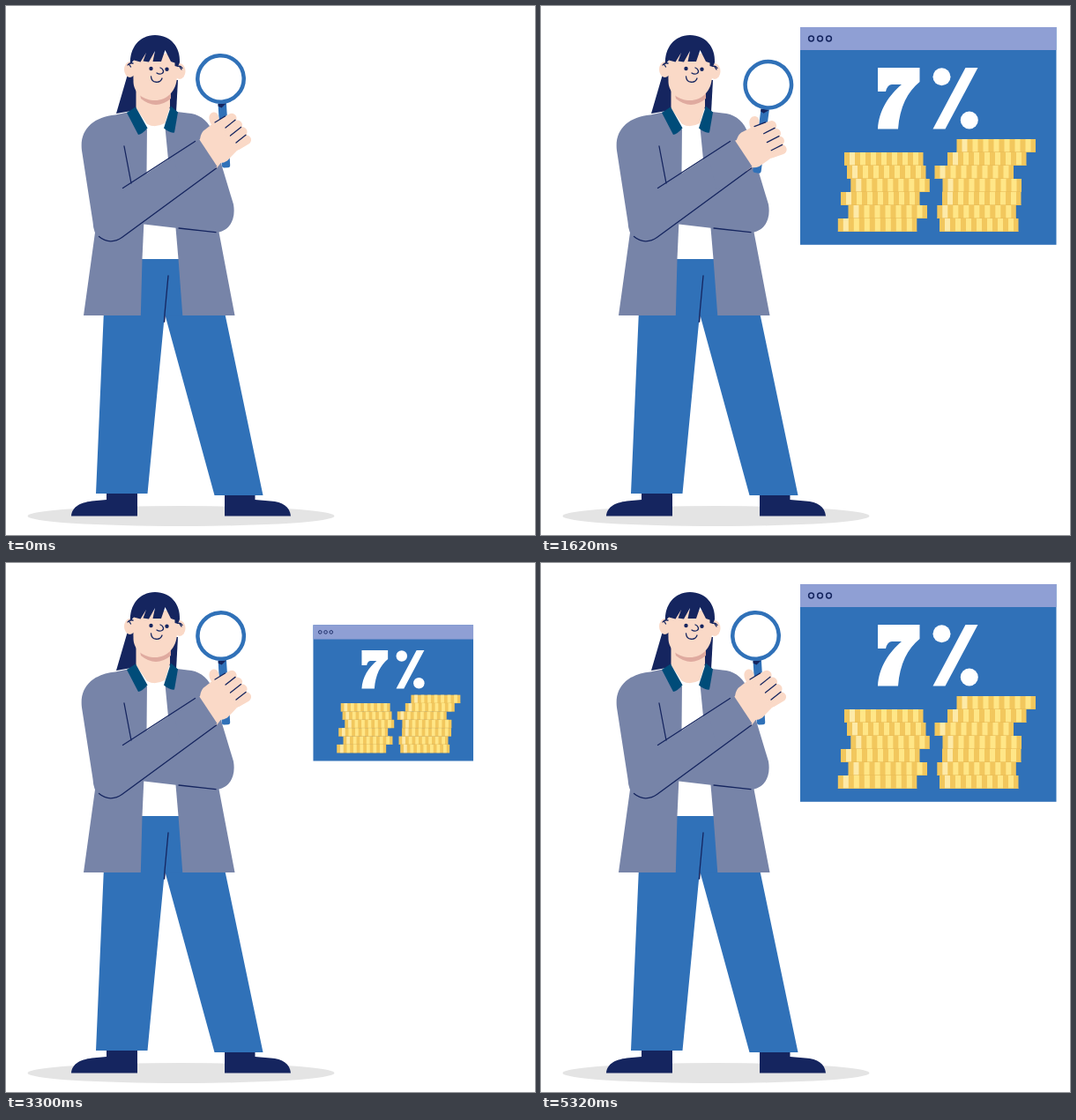
Write an HTML page that moves like this. It is 600x600 px and loops after 6 s.

```html
<!DOCTYPE html>
<html lang="en">
<head>
<meta charset="utf-8">
<title>Rate check</title>
<style>
html, body { margin: 0; width: 100%; height: 100%; overflow: hidden; background: #fff; }
svg { display: block; width: 100%; height: 100%; }
.navy { fill: #15255f; }
.blue { fill: #3071b8; }
.coat { fill: #7784a8; }
.skin { fill: #fad9c7; }
.teal { fill: #004c79; }
.white { fill: #fff; }
.line { fill: none; stroke: #15255f; stroke-width: 1.3; stroke-linecap: round; stroke-linejoin: round; }
.finger { fill: none; stroke: #fad9c7; stroke-width: 11; stroke-linecap: round; }
</style>
</head>
<body>
<svg viewBox="0 0 600 600">
  <ellipse cx="198.5" cy="578.5" rx="174" ry="11.5" fill="#e4e4e4"/>

  <g id="legs">
    <path class="navy" d="M74 578.5C75 567 86 562.5 100 561.2L114 560V552H149V578.5Z"/>
    <path class="navy" d="M248 554H282.500V560L300 561.5C314 562.500 322 568 323 578.5H248Z"/>
    <path class="blue" d="M154 286H196L200 345H247.500L291.5 555H236.500L180 349L160.500 553H102L111 345H153Z"/>
    <path class="line" d="M184 306L180 349L179.500 358"/>
  </g>

  <g id="torso">
    <path class="navy" d="M139 74L125 122L148 118V76Z"/>
    <path class="navy" d="M186 84H195L193 121L185 116Z"/>
    <path class="skin" d="M147.500 88V116L160 134Q169 140 180 134L186 114V88Z"/>
    <path class="coat" d="M138 120.500L124 123.500C99 126 83 140 86 164L98.500 245Q99 253 101 257L88 351H259.500L241.500 256.500C253 254 261 243 258 225L245 182L233 140C228 129 218 122 206 121.500L194 120L187 140H150Z"/>
    <path class="white" d="M160 134Q169 139 180 133L184 174L159.500 190Z"/>
    <path class="white" d="M156.300 247.500L192.500 251.800L195.500 287H154.500Z"/>
    <path class="blue" d="M154.500 287H195.500L200.300 351.500H180L179.800 352H152.800Z"/>
    <path class="line" d="M184 306L180 349L179.500 358"/>
    <path class="teal" d="M147 114.500L160.500 138.500Q155 145 150 146L137 121Z"/>
    <path class="teal" d="M187 113.500L195 120.500L191 143.500Q186 144.500 179 138.500Z"/>
  </g>

  <g id="head">
    <path d="M152 100Q168 110 187 99V105Q170 119 153 105Z" fill="#dfaa9f"/>
    <ellipse class="skin" cx="140.500" cy="72" rx="6.500" ry="9"/>
    <ellipse class="skin" cx="197" cy="74" rx="6.500" ry="9"/>
    <path class="skin" d="M144 54H194V80C193.500 97 182 107 169 107C156 107 145 99 144.500 86Z"/>
    <path class="navy" d="M141 66C140 48 151 33 169 33C187 33 198 47 197 64L195 69L191.500 68V64.500L187 63L180.500 50L176 63H166.500L169 51L162 63.500L155.500 62.500L159 53L152.500 63.500L145 61.500Z"/>
    <path class="line" d="M138 67Q140 64 144 65M139.500 66L141.500 69M195 68.500Q198 67 200 70.500M197 69L199 72"/>
    <circle class="navy" cx="164.500" cy="71" r="2.200"/>
    <circle class="navy" cx="182.500" cy="71.700" r="2.200"/>
    <path class="line" d="M175 70C178 71 180 75 177 76.500Q174 78 171 76M164.500 80C165 88 175 88 177 82"/>
  </g>

  <g id="hand">
    <g transform="translate(243.500 82.500) rotate(-3.500)">
      <path class="blue" d="M-4.700 28H4.700V98.500Q4.700 101 2.200 101H-2.200Q-4.700 101 -4.700 98.500Z"/>
      <path class="navy" d="M-4.700 28H4.700L-1 33L-4.700 31Z"/>
      <circle r="26.200" fill="#fff" stroke="#3071b8" stroke-width="4.500"/>
    </g>
    <path class="skin" d="M210 158L220 151Q221 143 226 140L233 134.500C229 129 229.500 121.500 235.500 120.500C240 120 242 125 241.500 130L251 125L262 138L274 156L262 164L251 175.500Q247 178 243.500 178L239 184L222 180Z"/>
    <path class="finger" d="M244 134L256 127.300M252 143L262.500 135M258 150L268 142.800M262 158L272.500 151.800"/>
    <path class="line" d="M237 132L248.500 125M249 138L260 129.300M254.500 147L266.500 137.500M261 155L272 146.300"/>
  </g>

  <path class="coat" d="M190 170L219 151L239.500 182L200 213Z"/>
  <path class="line" d="M134 159L142 201M132.500 206.500L214.500 153.500M105.500 261.500Q112 267 119 266.800Q126 266.500 131.500 262.500L238.500 184M196 252L238 256.700"/>

  <g id="panel">
    <rect class="blue" x="294" y="24" width="290.500" height="246.800"/>
    <rect x="294" y="24" width="290.500" height="26" fill="#8f9fd4"/>
    <g fill="none" stroke="#15255f" stroke-width="1.500">
      <circle cx="306.500" cy="37" r="2.900"/>
      <circle cx="316.500" cy="37" r="2.900"/>
      <circle cx="326.500" cy="37" r="2.900"/>
    </g>
    <g class="white" role="img" aria-label="7%">
      <path d="M382 70H429.500V86C416 97 407 114 405 139.500H382C383 118 395 101 409 89H398Q393 89 391 97H382Z"/>
      <path d="M481.500 70H495.500L458.500 139.500H444.500Z"/>
      <circle cx="454.500" cy="80.300" r="10"/>
      <circle cx="485.800" cy="129.500" r="10"/>
    </g>
    <g id="coins"></g>
  </g>
</svg>
<script>
const LOOP = 6000, HALF = 3000, TICK = 20;
const $ = id => document.getElementById(id);
const panel = $("panel"), hand = $("hand");

const COIN = { width: 89.5, height: 15, floor: 256 };
// Left edges of the coins, bottom to top
const stacks = [
  [336.8, 348.5, 340, 351.3, 347, 344],
  [452, 449.3, 455, 455.5, 446.5, 461, 471.5]
];

function rect(x, y, w, h, fill) {
  const r = document.createElementNS("http://www.w3.org/2000/svg", "rect");
  Object.entries({ x, y, width: w, height: h, fill }).forEach(([k, v]) => r.setAttribute(k, v));
  $("coins").append(r);
}

function drawCoin(x, y) {
  rect(x, y, COIN.width, COIN.height, "#f2c75d");
  for (let i = 0; i < 7; i++) {
    rect(x + 6 + i * 12, y, 6, COIN.height, i ? "#ffe687" : "#fdeaa8");
  }
  rect(x, y + COIN.height - 0.6, COIN.width, 0.6, "#e9bd58");
}

stacks.forEach(stack => stack.forEach((x, i) =>
  drawCoin(x, COIN.floor - (i + 1) * COIN.height)));

const clamp = v => Math.min(1, Math.max(0, v));
function ease(t, from, to) {
  const p = clamp((t - from) / (to - from));
  return p * p * (3 - 2 * p);
}

function draw(time) {
  const step = Math.floor((time % LOOP) / TICK) * TICK;
  // The first pass holds through its last tick
  const t = step > HALF ? step - HALF : step;
  const scale = clamp(t / 480);
  const angle = 11 * (ease(t, 260, 960) - ease(t, 1600, 2300));
  panel.setAttribute("visibility", scale ? "visible" : "hidden");
  panel.setAttribute("transform", `translate(439.25 147.4) scale(${scale}) translate(-439.25 -147.4)`);
  hand.setAttribute("transform", `rotate(${angle} 215.5 160.5)`);
}

const start = performance.now();
function frame() {
  draw(performance.now() - start);
  requestAnimationFrame(frame);
}
frame();
</script>
</body>
</html>
```
